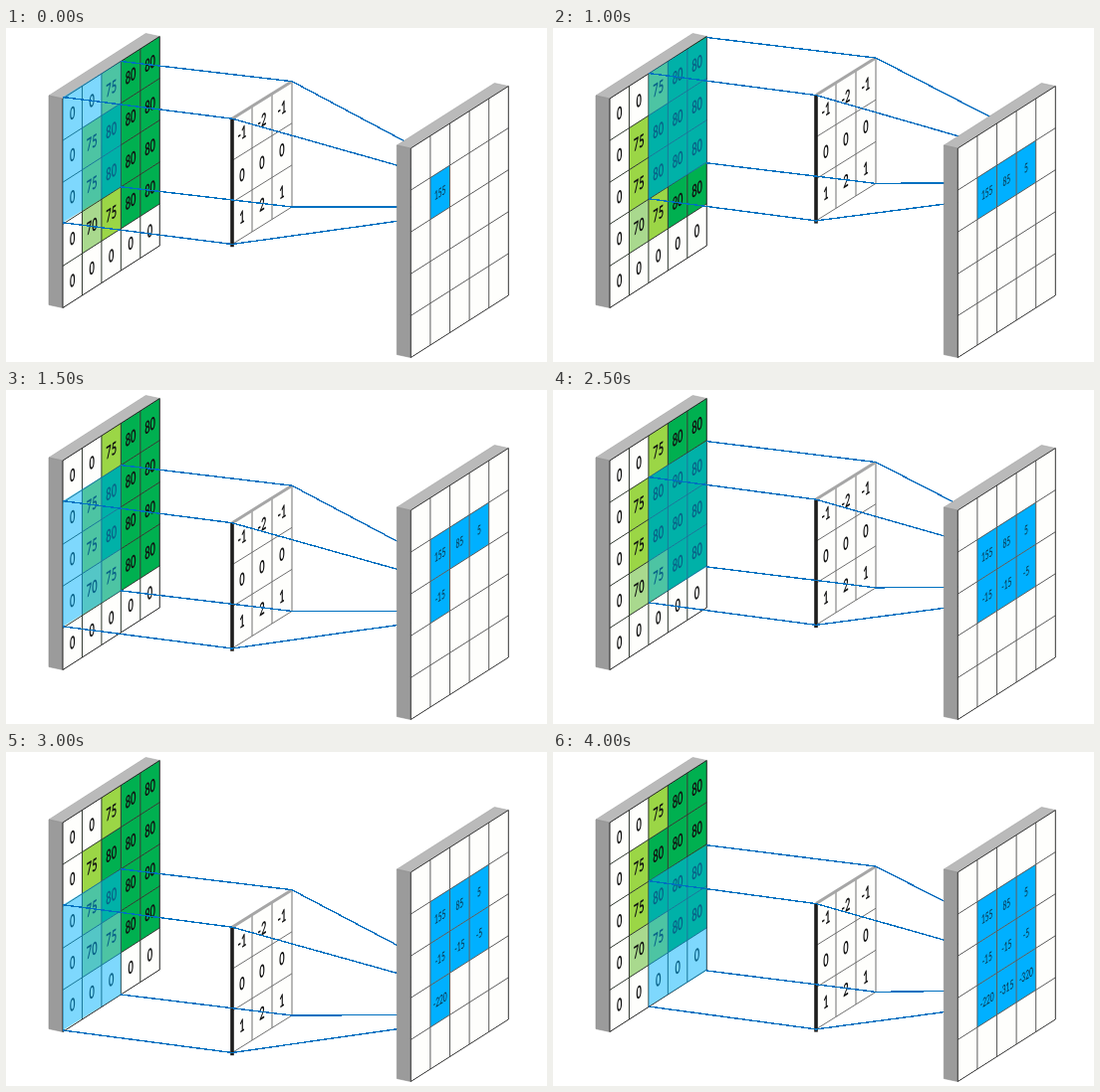
Write an HTML page that moves like this. It is 543 by 336 pixels and loops after 4500 ms.

```html
<!DOCTYPE html>
<html lang="en">
<head>
<meta charset="utf-8">
<title>Convolution step by step</title>
<style>
html, body { margin: 0; width: 100%; height: 100%; overflow: hidden; background: #fff; }
svg { display: block; width: 100vw; height: 100vh; }
text { font-family: Lato, "Open Sans", sans-serif; text-anchor: middle; fill: #111; }
.big { font-size: 17.5px; font-weight: 700; }
.small { font-size: 12.5px; fill: #0c2c3e; }
.link { fill: none; stroke: #0070c0; stroke-width: 1.4; shape-rendering: crispEdges; }
</style>
</head>
<body>
<svg id="stage" viewBox="0 0 543 336"></svg>
<script>
const STEP = 500, SIZE = 3, ROW = 42.1;
const INPUT = [
  [0, 0, 75, 80, 80],
  [0, 75, 80, 80, 80],
  [0, 75, 80, 80, 80],
  [0, 70, 75, 80, 80],
  [0, 0, 0, 0, 0]
];
const KERNEL = [[-1, -2, -1], [0, 0, 0], [1, 2, 1]];
const RESULT = [155, 85, 5, -15, -15, -5, -220, -315, -320];
const SHADES = { 0: '#fefefc', 70: '#a9d98e', 75: '#9bd646', 80: '#00b050' };

const stage = document.getElementById('stage');

function add(parent, tag, attrs = {}, content) {
  const node = document.createElementNS('http://www.w3.org/2000/svg', tag);
  for (const key in attrs) node.setAttribute(key, attrs[key]);
  if (content !== undefined) node.textContent = content;
  parent.append(node);
  return node;
}

// A slanted plane: maps column and row to stage coordinates.
const plane = (x, y, col, rise) => (c, r) => [x + c * col, y + r * ROW - c * rise];
const inputAt = plane(57, 71, 19.45, 12.5);
const windowAt = plane(57, 69.5, 19.45, 12);
const outputAt = plane(406.3, 121, 19.6, 12.5);
const kernelAt = plane(0, 0, 20, 12.5);

const polygon = (parent, points, attrs) =>
  add(parent, 'polygon', { points: points.join(' '), ...attrs });

const patch = (parent, at, c, r, w, h, attrs) =>
  polygon(parent, [at(c, r), at(c + w, r), at(c + w, r + h), at(c, r + h)], attrs);

const line = (parent, [x1, y1], [x2, y2], attrs) =>
  add(parent, 'line', { x1, y1, x2, y2, ...attrs });

function grid(parent, at, n, stroke, outline = stroke) {
  for (let i = 1; i < n; i++) {
    line(parent, at(i, 0), at(i, n), { stroke });
    line(parent, at(0, i), at(n, i), { stroke });
  }
  patch(parent, at, 0, 0, n, n, { fill: 'none', stroke: outline });
}

function label(parent, at, c, r, value, kind) {
  const [x, y] = at(c + .5, r + .5);
  const drop = kind === 'big' ? 6 : 4.5;
  return add(parent, 'text', {
    class: kind, transform: `matrix(.53 -.34 0 1 ${x} ${y + drop})`
  }, value);
}

function slab(parent, at) {
  const back = (c, r) => { const [x, y] = at(c, r); return [x - 14, y - 3]; };
  polygon(parent, [back(0, 0), back(5, 0), at(5, 0), at(0, 0)], { fill: '#bababa', stroke: '#a5a5a5', 'stroke-width': .6 });
  polygon(parent, [back(0, 0), at(0, 0), at(0, 5), back(0, 5)], { fill: '#9b9b9b', stroke: '#8c8c8c', 'stroke-width': .6 });
  patch(parent, at, 0, 0, 5, 5, { fill: '#fefefc' });
}

// Input panel with its sliding window
slab(stage, inputAt);
INPUT.forEach((row, r) => row.forEach((value, c) =>
  patch(stage, inputAt, c, r, 1, 1, { fill: SHADES[value] })));
grid(stage, inputAt, 5, '#30382f', '#222');
INPUT.forEach((row, r) => row.forEach((value, c) => label(stage, inputAt, c, r, value, 'big')));
const win = patch(stage, windowAt, 0, 0, SIZE, SIZE, { fill: '#00b4ff', 'fill-opacity': .5 });

// Kernel
const kernel = add(stage, 'g');
patch(kernel, kernelAt, 0, 0, SIZE, SIZE, { fill: '#fefefc' });
grid(kernel, kernelAt, SIZE, '#707070');
line(kernel, [0, 0], [60, -37.5], { stroke: '#a6a6a6', 'stroke-width': 3 });
line(kernel, [0, 0], [0, 129], { stroke: '#1c1c1c', 'stroke-width': 3.6 });
KERNEL.forEach((row, r) => row.forEach((value, c) => label(kernel, kernelAt, c, r, value, 'big')));

// Guide lines, one per window corner
const corners = [[0, 0], [1, 0], [0, 1], [1, 1]];
const links = corners.map(() => add(stage, 'polyline', { class: 'link' }));

// Output panel, drawn over the ends of the guide lines
slab(stage, outputAt);
const cells = RESULT.map((_, i) =>
  patch(stage, outputAt, 1 + i % SIZE, 1 + Math.floor(i / SIZE), 1, 1, { fill: '#00b0ff' }));
grid(stage, outputAt, 5, '#5c5c5c', '#333');
const results = RESULT.map((value, i) =>
  label(stage, outputAt, 1 + i % SIZE, 1 + Math.floor(i / SIZE), value, 'small'));

function show(step) {
  const c = step % SIZE, r = Math.floor(step / SIZE);
  const [x0, y0] = windowAt(0, 0), [x, y] = windowAt(c, r);
  win.setAttribute('transform', `translate(${x - x0} ${y - y0})`);

  const kx = 227 + 18.5 * c, ky = 91.2 + 42.5 * r - 11.8 * c;
  kernel.setAttribute('transform', `translate(${kx} ${ky})`);

  corners.forEach(([u, v], i) => {
    const [px, py] = kernelAt(u * SIZE, v * SIZE);
    const [ox, oy] = outputAt(1 + c + u, 1 + r + v);
    const lift = u ? 0 : (2 - c) * 1.5;
    links[i].setAttribute('points', [
      windowAt(c + u * SIZE, r + v * SIZE), [kx + px, ky + py], [ox, oy - lift]
    ].join(' '));
  });

  RESULT.forEach((_, i) => {
    const visibility = i <= step ? 'visible' : 'hidden';
    cells[i].setAttribute('visibility', visibility);
    results[i].setAttribute('visibility', visibility);
  });
}

const start = performance.now();
let current = 0;
show(current);

function tick(now) {
  const step = Math.floor(Math.max(0, now - start) / STEP) % RESULT.length;
  if (step !== current) show(current = step);
  requestAnimationFrame(tick);
}
requestAnimationFrame(tick);
</script>
</body>
</html>
```
